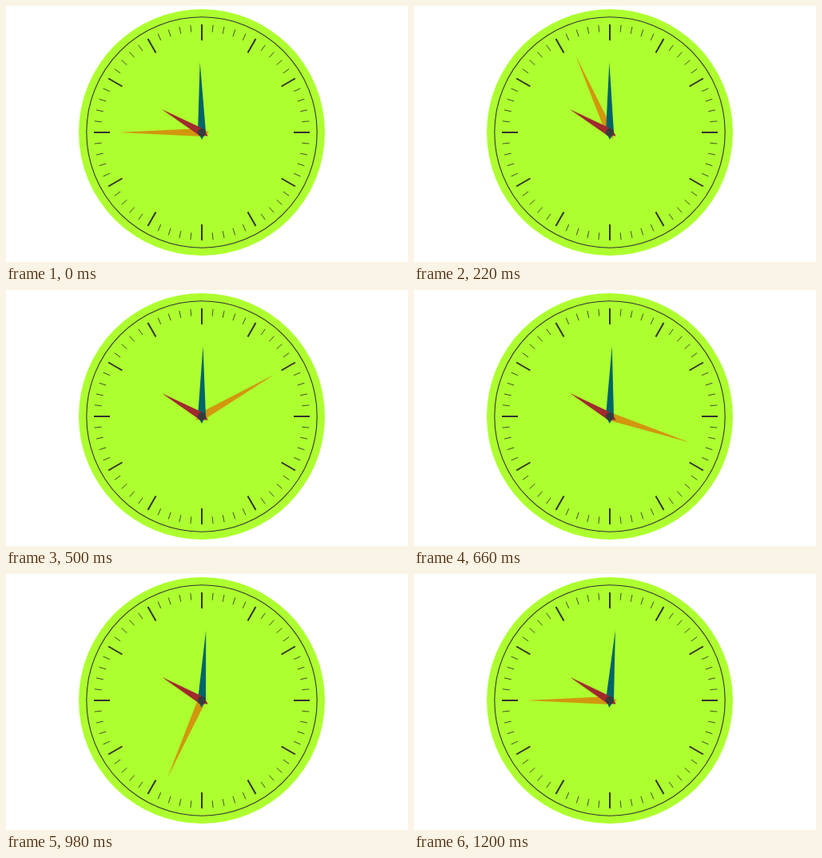
These frames come from a looping animation (503 px wide and 320 px high, 1.22 s). An HTML page:

```html
<!DOCTYPE html>
<html>
<head>
<meta charset="utf-8">
<title>Clock</title>
<style>
  html, body { margin: 0; width: 100%; height: 100%; overflow: hidden; background: #fff; }
  svg { display: block; }
</style>
</head>
<body>
<svg width="503" height="320" viewBox="0 0 503 320">
  <g transform="translate(245 158)">
    <circle r="154" fill="#adff2f"/>
    <circle r="144.2" fill="none" stroke="#333" stroke-width="1.1"/>
    <g id="ticks" stroke="#333"></g>
    <path id="second" fill="#d2960f" d="M0-105L5 0L0 9L-5 0Z"/>
    <path id="minute" fill="#006469" d="M0-88L5 0L0 9L-5 0Z"/>
    <path id="hour" fill="#a02a2e" d="M0-58L5 0L0 9L-5 0Z"/>
    <circle r="5" fill="#333c3e"/>
  </g>
</svg>
<script>
const LOOP = 1220, STEP = 20, START = 45;
const byId = id => document.getElementById(id);
const rotate = (id, angle) => byId(id).setAttribute('transform', `rotate(${angle})`);

byId('ticks').innerHTML = Array.from({ length: 60 }, (_, i) => {
  const major = i % 5 === 0;
  return `<path d="M0-135V${major ? -115 : -126}" stroke-width="${major ? 2 : 0.8}" transform="rotate(${i * 6})"/>`;
}).join('');

// Each step advances the clock one second, from 9:59:45 to 10:00:45.
function draw(now) {
  const seconds = START + Math.floor(now % LOOP / STEP);
  const minutes = 59 + seconds / 60;
  rotate('second', seconds * 6);
  rotate('minute', minutes * 6);
  rotate('hour', (9 + minutes / 60) * 30);
  requestAnimationFrame(draw);
}
draw(performance.now());
</script>
</body>
</html>
```
